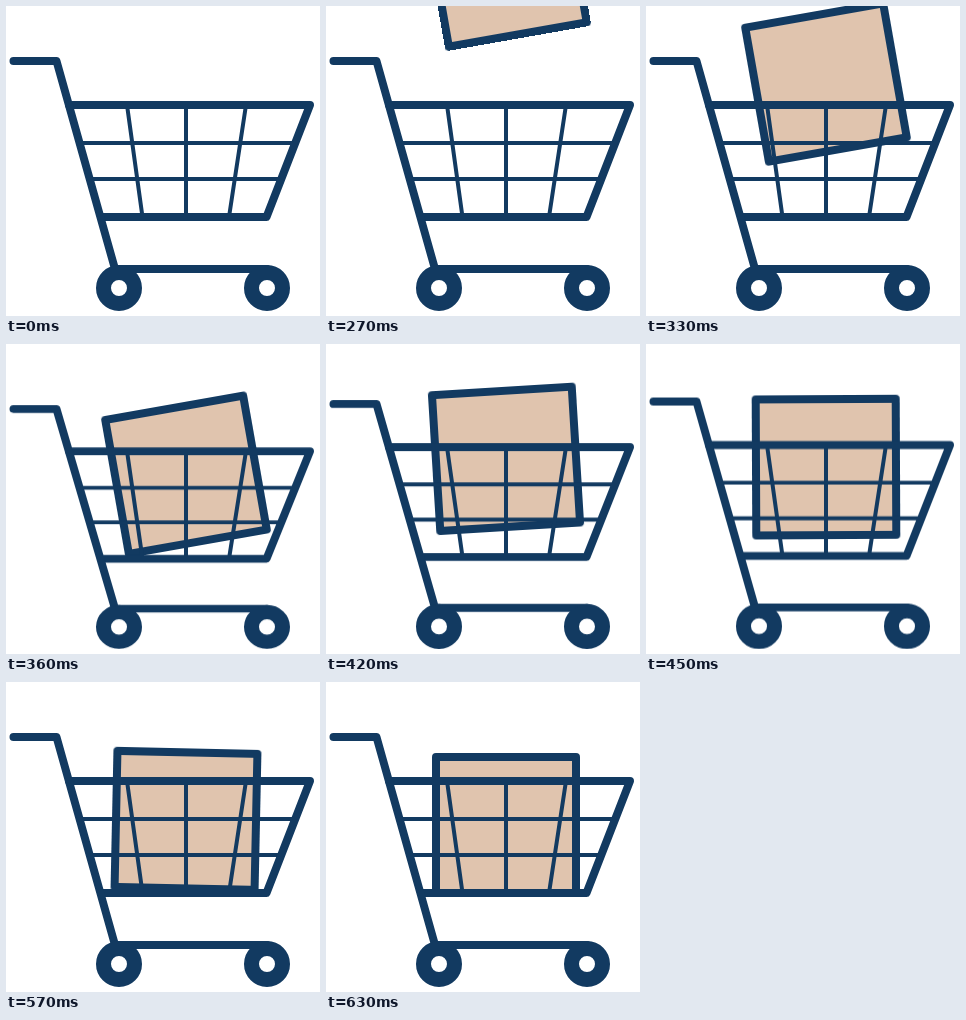
Recreate the animation shown at these times as an HTML page. Size 314 by 310 pixels, loop 2250 ms.

```html
<!DOCTYPE html>
<html lang="en">
<head>
<meta charset="utf-8">
<title>Box drops into cart</title>
<style>
  html, body { margin: 0; width: 100%; height: 100%; overflow: hidden; background: #fff; }
  svg { display: block; width: 314px; height: 310px; }

  .line { fill: none; stroke: #123a61; stroke-width: 8; stroke-linecap: round; stroke-linejoin: round; }
  .grid { stroke-width: 4; stroke-linecap: butt; }
  .wheel { stroke-width: 15; }
  .box { fill: #e0c4ae; }

  /* 30 ms ticks; the tiny negative delay keeps each tick on its boundary */
  .box, .cart { animation: 2250ms step-end -1ms infinite; }
  .box { animation-name: drop; transform-origin: 180px 143px; }
  .cart { animation-name: squash; transform-origin: 180px 305px; }

  @keyframes drop {
    0%        { transform: translateY(-300px) rotate(-10deg); }
    12%       { transform: translateY(-181.5px) rotate(-10deg); animation-timing-function: steps(2); }
    14.6667%  { transform: translateY(-66.5px) rotate(-10deg); }
    16%       { transform: translateY(-12.2px) rotate(-10deg); animation-timing-function: steps(2); }
    18.6667%  { transform: translateY(-28.2px) rotate(-3.5deg); animation-timing-function: steps(2); }
    21.3333%  { transform: translateY(-11.5px) rotate(3deg); animation-timing-function: steps(5); }
    28%, 100% { transform: translateY(0) rotate(0deg); }
  }

  @keyframes squash {
    0%             { transform: scaleY(1); }
    16%            { transform: scaleY(.96); animation-timing-function: steps(4); }
    21.3333%, 100% { transform: scaleY(1); }
  }
</style>
</head>
<body>
<svg viewBox="0 0 314 310">
  <rect class="line box" x="110" y="75" width="140" height="136"/>
  <g class="cart">
    <path class="line grid" d="M74 137H289M84 173H275M121 99L136.500 211M180 99V211M240 99L223 211"/>
    <path class="line" d="M63 99H304L260.500 211H95"/>
    <path class="line" d="M7.500 55H50.500L109 263H261"/>
    <g fill="#fff">
      <circle cx="113" cy="282" r="12"/>
      <circle cx="261" cy="282" r="12"/>
    </g>
    <circle class="line wheel" cx="113" cy="282" r="15.500"/>
    <circle class="line wheel" cx="261" cy="282" r="15.500"/>
  </g>
</svg>
</body>
</html>
```
